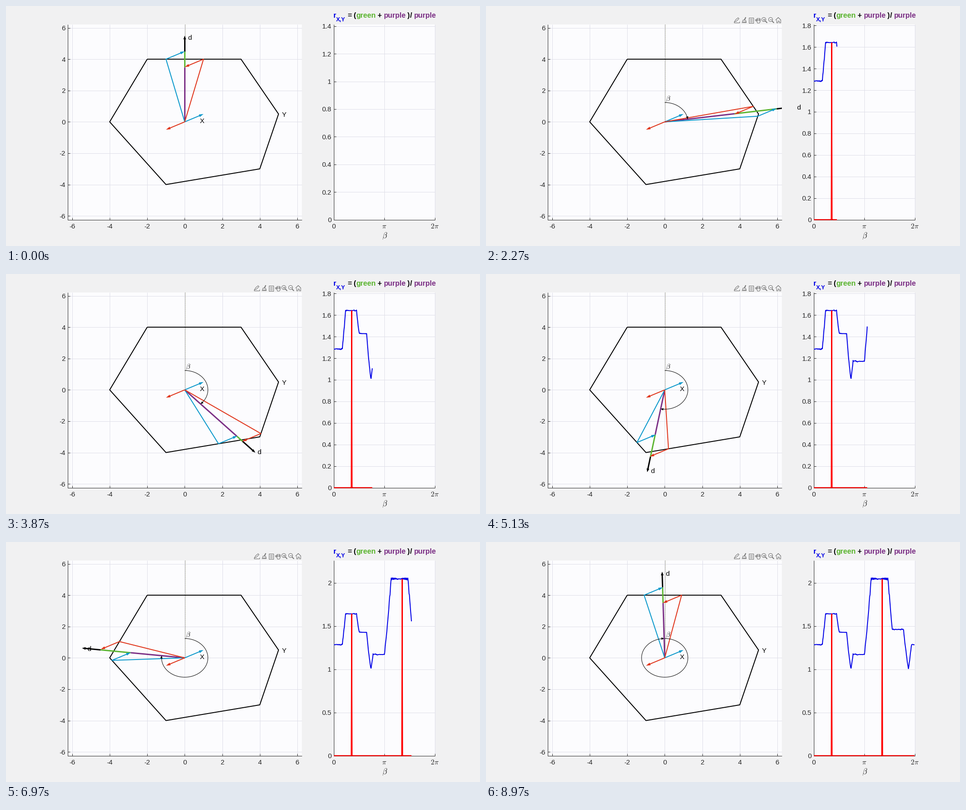
Animation, 1051 px wide and 533 px high, one loop 9.01 s. Source, as a matplotlib script:

```python
import numpy as np
import matplotlib.pyplot as plt
from matplotlib.animation import FuncAnimation
from matplotlib.patches import Circle, Polygon, Rectangle

W, H, DPI = 1051, 533, 64
PT = 72 / DPI                       # points per pixel
plt.rcParams["font.family"] = "Liberation Sans"
plt.rcParams["mathtext.fontset"] = "cm"

INK, GRID, PANEL = "#262626", "#dedee8", "#fcfcfe"
BLUE, RED, GREEN, PURPLE = "#0a98cb", "#e0341a", "#5cb531", "#7b2f85"
LEFT, RIGHT, TOP, BASE = 137, 656, 40.5, 474.5
PX0, PX1 = 727, 951                 # ratio plot, horizontal extent

fig = plt.figure(figsize=(W / DPI, H / DPI), dpi=DPI, facecolor="#f1f1f2")
ax = fig.add_axes([0, 0, 1, 1])
ax.set_xlim(0, W)
ax.set_ylim(H, 0)
ax.axis("off")


def line(xs=(), ys=(), color=INK, width=1.0, z=2, clip=None, **kw):
    ln, = ax.plot(xs, ys, color=color, lw=width * PT, zorder=z,
                  solid_capstyle="butt", **kw)
    if clip is not None:
        ln.set_clip_path(clip)
    return ln


def label(x, y, s, size=15, color=INK, ha="left", z=8, **kw):
    return ax.text(x, y, s, fontsize=size * PT, color=color, ha=ha,
                   va="baseline", zorder=z, **kw)


def panel(x0, x1):
    box = Rectangle((x0, TOP), x1 - x0, BASE - TOP, fc=PANEL, ec="none", zorder=0)
    ax.add_patch(box)
    line((x0, x0, x1), (TOP, BASE, BASE), width=1, z=3)
    return box


def to_px(p):
    p = np.asarray(p, float)
    return np.stack([396.3 + 41.6 * p[..., 0], 257.3 - 34.8 * p[..., 1]], -1)


class Arrow:
    """Shaft with a filled head, both given in data units."""

    def __init__(self, color, width, z, length=10, half=3.0):
        self.size = length, half
        self.shaft = line(color=color, width=width, z=z, clip=main)
        self.head = Polygon(np.zeros((3, 2)), fc=color, ec="none", zorder=z)
        ax.add_patch(self.head)
        self.head.set_clip_path(main)

    def set(self, pts):
        px = to_px(pts)
        tip = px[-1]
        length, half = self.size
        back = px[-1] - px[-2]
        reach_px = np.hypot(*back)
        back = back / max(reach_px, 1e-9)
        side = np.array([-back[1], back[0]]) * half
        neck = tip - back * length
        self.head.set_xy([tip, neck + side, neck - side])
        px[-1] = tip - back * min(length * 0.6, reach_px)
        self.shaft.set_data(px[:, 0], px[:, 1])


# ---- geometry -------------------------------------------------------------
STEPS, PER_EDGE = 250, 50
corners = np.array([(-2, 4), (3, 4), (5, .5), (4, -3), (-1, -4), (-4, 0)])
nxt = np.roll(corners, -1, axis=0)
share = np.arange(PER_EDGE)[:, None] / PER_EDGE
edge = np.concatenate([a + (b - a) * share for a, b in zip(corners, nxt)])
X = np.array([1, .5])
beta = np.arange(STEPS) * 2 * np.pi / STEPS
heading = np.stack([np.sin(beta), np.cos(beta)], 1)


def reach(shift):
    """Boundary point whose shifted position lies closest to each heading."""
    moved = edge + shift
    unit = moved / np.hypot(moved[:, 0], moved[:, 1])[:, None]
    best = np.argmax(heading @ unit.T, axis=1)
    return edge[best], moved[best]


blue_y, blue_end = reach(X)
red_y, red_end = reach(-X)
len_b, len_r = np.hypot(*blue_end.T), np.hypot(*red_end.T)
far, near = np.maximum(len_b, len_r), np.minimum(len_b, len_r)
ratio = far / near
parallel = np.abs(heading @ X) / np.hypot(*X) > np.cos(np.pi / STEPS)
spike = np.where(parallel, ratio, 0)
plot_x = PX0 + (PX1 - PX0) * beta / (2 * np.pi)

# ---- main panel -----------------------------------------------------------
main = panel(LEFT, RIGHT)
for v in range(-6, 7, 2):
    gx, gy = to_px((v, v))
    line((gx, gx), (TOP, BASE), GRID, 1, 1)
    line((LEFT, RIGHT), (gy, gy), GRID, 1, 1)
    line((gx, gx), (BASE - 5, BASE))
    line((LEFT, LEFT + 5), (gy, gy))
    label(gx, 494.3, str(v), ha="center")
    label(131.5, gy + 5.4, str(v), ha="right")

line((396.5, 396.5), (TOP, 257), "#3c3c14", 1, 2, linestyle=(0, (1, 1.6)))
hexagon = to_px(np.vstack([corners, corners[:1]]))
line(hexagon[:, 0], hexagon[:, 1], "black", 2, 3)

d_arrow = Arrow("black", 3, 4, 8, 3)
green_bar = line(color=GREEN, width=3, z=4.2, clip=main)
purple_bar = line(color=PURPLE, width=3, z=4.4, clip=main)
blue_path, red_path = Arrow(BLUE, 2, 5), Arrow(RED, 2, 5.4)
Arrow(BLUE, 2, 5).set([(0, 0), X])
Arrow(RED, 2, 5.4).set([(0, 0), -X])
arc = Arrow("black", 1, 6, 6, 2.6)
arc_label = label(398.5, 210.5, r"$\beta$", 16)
x_label = label(429.2, 259.5, "X", color="black")
y_label = label(612.2, 245.5, "Y", color="black")
d_label = label(0, 0, "d", color="black")

# ---- toolbar --------------------------------------------------------------
TOOL = "#6c6c6c"
tools = []


def stroke(xs, ys, width=1.0):
    tools.append(line(xs, ys, TOOL, width, 8))


def shape(p):
    p.set(fc="none", ec=TOOL, lw=PT, zorder=8)
    tools.append(ax.add_patch(p))


stroke((550, 550, 562, 562), (34, 37, 37, 34))
stroke((551, 554, 559, 561, 555, 551), (35, 30, 26, 28, 34, 35))
stroke((573, 576), (31, 25), 2)
stroke((570, 576, 577, 568, 570), (31, 32, 37, 37, 31))
stroke((569, 577), (35, 35))
shape(Rectangle((582.5, 25.5), 10, 12))
for y in (29, 32, 35):
    stroke((585, 591), (y, y))
stroke((599, 597, 599, 602, 606, 608, 608), (34, 31, 30, 38, 38, 35, 28))
for x, y in ((599.5, 27), (602, 25.5), (604.5, 25.5), (607, 27)):
    stroke((x, x), (y, 33), 1.2)
for x in (616, 631):
    shape(Circle((x, 30), 4.5))
    stroke((x + 3.2, x + 7.5), (33.2, 37.5), 1.8)
    stroke((x - 2.5, x + 2.5), (30, 30))
stroke((616, 616), (27.5, 32.5))
stroke((642, 648, 654), (31.5, 25.5, 31.5), 1.2)
stroke((644, 644, 647, 647, 650, 650, 652.5, 652.5),
       (30.5, 37, 37, 33, 33, 37, 37, 30.5))

# ---- ratio panel ----------------------------------------------------------
panel(PX0, PX1)
for gx, s in ((PX0, "0"), (839, r"$\pi$"), (PX1, r"$2\pi$")):
    if s != "0":
        line((gx, gx), (TOP, BASE), GRID, 1, 1)
        line((gx, gx), (BASE - 5, BASE))
    label(gx, 494.3, s, 15 if s == "0" else 16, ha="center")
label(839.5, 515, r"$\beta$", 17, ha="center")

for x, s, c in ((726, "r", "#0000e6"), (757, "=", "black"), (770, "(", "black"),
                (776, "green", GREEN), (823.5, "+", "black"),
                (837.5, "purple", PURPLE), (890, ")", "black"),
                (896, "/", "black"), (904.5, "purple", PURPLE)):
    label(x, 26, s, 16, c, weight="bold")
label(731.5, 34, "X,Y", 12.8, "#0000e6", weight="bold")

ticks = [(line((PX0, PX1), (0, 0), GRID, 1, 1), line((PX0, PX0 + 5), (0, 0)),
          label(721.5, 0, "", ha="right")) for _ in range(11)]
ratio_line = line(color="#0000e6", width=2, z=5)
spike_line = line(color="#ff0000", width=2.2, z=6, solid_joinstyle="bevel")

# ---- motion ---------------------------------------------------------------
INTERVAL, FRAMES = 34, 265
KEY_T = (0, 2270, 3870, 5130, 6170, 7730, 8970)
KEY_K = (0, 57, 95, 132, 166, 215, 249)


def set_ticks(top):
    step = 0.2 if top < 2 else 0.5
    for i, (grid, tick, text) in enumerate(ticks):
        v = i * step
        show = v <= top
        y = BASE - (BASE - TOP) * v / top
        for part in (grid, tick):
            part.set_ydata((y, y))
            part.set_visible(show)
        text.set_visible(show)
        text.set_text(f"{v:.1f}".replace(".0", ""))
        text.set_y(y + 5.4)


def draw(n):
    k = int(round(np.interp((n + 0.5) * INTERVAL, KEY_T, KEY_K)))
    u = heading[k]

    tip = u * (far[k] + 1)
    d_arrow.set([u * far[k], tip])
    for bar, a, b in ((green_bar, near[k], far[k]), (purple_bar, 0, near[k])):
        bar.set_data(*to_px([u * a, u * b]).T)
    blue_path.set([(0, 0), blue_y[k], blue_end[k]])
    red_path.set([(0, 0), red_y[k], red_end[k]])
    lx, ly = to_px(tip - 0.1 * u + (0.18, 0))
    d_label.set_position((lx, ly + 5.8))

    # labels give way while the arrow sweeps across them
    clear = not 1.2 < beta[k] < 1.7
    x_label.set_visible(clear)
    y_label.set_visible(clear)

    turning = k > 0
    sweep = np.linspace(0, beta[k], 8 + k)
    arc.set(1.235 * np.stack([np.sin(sweep), np.cos(sweep)], 1))
    for part in (arc.shaft, arc.head, arc_label):
        part.set_visible(turning)
    for part in tools:
        part.set_visible(n > 0)

    top = 1.1 * ratio[:k + 1].max()
    set_ticks(top)
    for ln, data in ((ratio_line, ratio), (spike_line, spike)):
        ln.set_data(plot_x[:k + 1], BASE - (BASE - TOP) * data[:k + 1] / top)
        ln.set_visible(turning)
    return []


anim = FuncAnimation(fig, draw, frames=FRAMES, interval=INTERVAL,
                     init_func=lambda: draw(0), repeat=True, repeat_delay=0,
                     blit=False)
plt.show()
```
